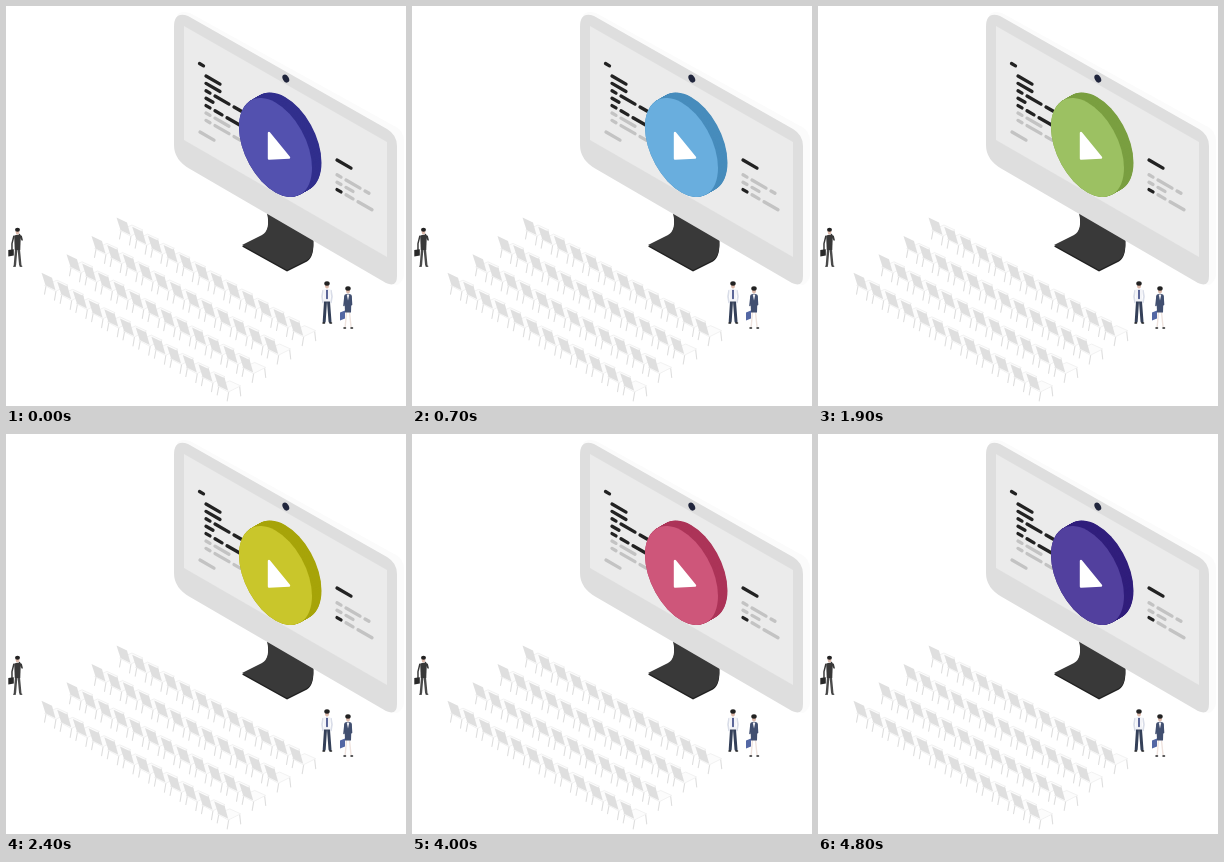
An HTML page with a canvas that plays this animation: 400 by 400 pixels, repeating every 4.9 s.

```html
<!DOCTYPE html>
<html lang="en">
<head>
<meta charset="utf-8">
<title>Online event</title>
<style>
  html, body { margin: 0; width: 100%; height: 100%; overflow: hidden; background: #fff; }
  canvas { display: block; width: 400px; height: 400px; }
</style>
</head>
<body>
<canvas id="stage"></canvas>
<script>
const LOOP = 4900, SLOT = 700, HOLD = 300, STEP = 100, STEPS = 5;
const SLOPE = 0.577; // tan 30°, isometric
const WORD = { S: 4, M: 7, L: 14 };
const BLACK = '#222', GRAY = '#c3c3c3', SKIN = '#ddb9aa';

// Button colours; the last blend stops just short of its end
const COLORS = [
  [83, 81, 175], [105, 174, 222], [102, 172, 182], [192, 207, 42],
  [238, 160, 45], [235, 90, 83], [187, 83, 148], [56, 59, 160]
];

const canvas = document.getElementById('stage');
const dpr = window.devicePixelRatio || 1;
canvas.width = canvas.height = 400 * dpr;
const ctx = canvas.getContext('2d');
ctx.scale(dpr, dpr);
ctx.lineCap = ctx.lineJoin = 'round';

function fill(d, color) {
  ctx.fillStyle = color;
  ctx.fill(new Path2D(d));
}

function stroke(d, color, width) {
  ctx.strokeStyle = color;
  ctx.lineWidth = width;
  ctx.stroke(new Path2D(d));
}

function dot(x, y, rx, ry, color, turn = 0) {
  ctx.fillStyle = color;
  ctx.beginPath();
  ctx.ellipse(x, y, rx, ry, turn, 0, Math.PI * 2);
  ctx.fill();
}

function at(x, y, paint) {
  ctx.save();
  ctx.translate(x, y);
  paint();
  ctx.restore();
}

// Rows of short, medium and long words; lower case is gray
function textBlock(x, y, rows) {
  rows.forEach((row, i) => {
    let dx = 0;
    for (const c of row) {
      const w = WORD[c.toUpperCase()];
      const color = c === c.toUpperCase() ? BLACK : GRAY;
      stroke(`M${x + dx} ${y + i * 7.4 + dx * SLOPE}l${w} ${w * SLOPE}`, color, 3.3);
      dx += w + 5;
    }
  });
}

function drawStand() {
  const base = 'M261 205Q265 224 256 229L236 239L281 264L301 254Q309 249 307 230Z';
  at(0, 1.5, () => fill(base, '#202020'));
  fill(base, '#393939');
}

function drawMonitor() {
  fill('M171 9Q175 4 184 7L390 121Q398 126 398 135V268Q398 275 391 279L380 277Z', '#fbfbfb');
  fill('M168 21Q168 5 182 10L381 123Q391 129 391 140V270Q391 282 380 277L184 163Q168 154 168 139Z', '#dedede');
  fill('M178 20L381 136V251L178 134Z', '#ebebeb');
  dot(279.8, 72.6, 3, 4.3, '#20253c', -0.5);
  textBlock(193.5, 57.5, ['S']);
  textBlock(200, 70, ['L', 'L', 'SLM', 'M', 'SML', 'sl', 'slm']);
  textBlock(194, 126, ['l']);
  textBlock(331, 154, ['L', '', 'sls', 'sm', 'Sml']);
}

function drawChair() {
  const back = 'M0.5 0.5L11 5.5L14.5 18L4.5 13Z';
  const seat = 'M4 13L16 8L27 13L15 19Z';
  stroke('M5 14L3.5 22M15 19L13.5 28M26 14L27 23', '#dedede', 1.1);
  fill(seat, '#fcfcfc');
  stroke(seat, '#ededed', 0.7);
  fill(back, '#dfdfdf');
}

function drawChairs() {
  for (let row = 0; row < 4; row++)
    for (let i = 0; i < 12; i++)
      at(110 - row * 25 + i * 15.7, 211 + row * 18.4 + i * 9.15, drawChair);
}

// Figure about 42 px tall, origin at the top of the head
function figure({ coat, sleeve, arms, hem, legs, legWidth }) {
  stroke(`M-1.5 ${hem}L-2.8 40M1.5 ${hem}L3 40`, legs, legWidth);
  stroke('M-4 41.5H-2.5M3 41.5H4.5', BLACK, 1.5);
  stroke(arms, sleeve, 1.6);
  fill(`M-3.6 8.5Q0 6 3.6 8.5L3 ${hem}H-3Z`, coat);
  dot(0, 4, 2, 3, SKIN);
  dot(0, 2, 2.7, 2.2, BLACK);
}

function drawPeople() {
  at(11.5, 222, () => {
    ctx.scale(0.92, 0.92);
    figure({ coat: '#383838', sleeve: '#383838', arms: 'M-4 9L-6 17L-6 24M4 9L5 13L2 7',
      hem: 24, legs: '#4a4a4a', legWidth: 2.6 });
    fill('M-10 24L-4 23V30L-10 31Z', '#292929');
  });
  at(321, 275.5, () => {
    figure({ coat: '#f3f4f8', sleeve: '#d9dde8', arms: 'M-4 9L-5 15L-4 21M4 9L5 15L4 21',
      hem: 20, legs: '#344059', legWidth: 3 });
    stroke('M0 9V17', '#34427f', 1.6);
  });
  at(342, 280.5, () => {
    figure({ coat: '#414f70', sleeve: '#414f70', arms: 'M-3 10L-4 19M3 10L3.5 18L-1 20',
      hem: 26, legs: '#efe3de', legWidth: 1.4 });
    fill('M-8 26L-3 24V32L-8 34Z', '#5367a4');
    fill('M-1.3 8H1.3L0 14Z', '#f0f0f5');
  });
}

// Circle lying in the plane of the screen
function disc(x, y) {
  at(x, y, () => {
    ctx.transform(36.5, 20.5, 0, 45, 0, 0);
    ctx.beginPath();
    ctx.arc(0, 0, 1, 0, Math.PI * 2);
  });
  ctx.fill();
}

function drawButton(face) {
  const rgb = c => `rgb(${c.map(Math.round)})`;
  ctx.fillStyle = rgb(face.map(v => Math.max(0, v - 34)));
  for (let d = 9.5; d >= 0; d -= 0.5) disc(269.5 + d, 141.5 - d * SLOPE);
  ctx.fillStyle = rgb(face);
  disc(269.5, 141.5);
  const play = 'M263 127V152.5L283 151.5Z';
  fill(play, '#fff');
  stroke(play, '#fff', 2.4);
}

function draw(now) {
  const t = now % LOOP;
  const slot = Math.floor(t / SLOT);
  const fade = t % SLOT - HOLD;
  const k = fade < 0 ? 0 : (Math.floor(fade / STEP) + 1) / STEPS;
  const next = COLORS[slot + 1];

  ctx.fillStyle = '#fff';
  ctx.fillRect(0, 0, 400, 400);
  drawStand();
  drawMonitor();
  drawButton(COLORS[slot].map((v, i) => v + (next[i] - v) * k));
  drawChairs();
  drawPeople();
}

const start = performance.now();
function tick() {
  draw(performance.now() - start);
  requestAnimationFrame(tick);
}
tick();
</script>
</body>
</html>
```
